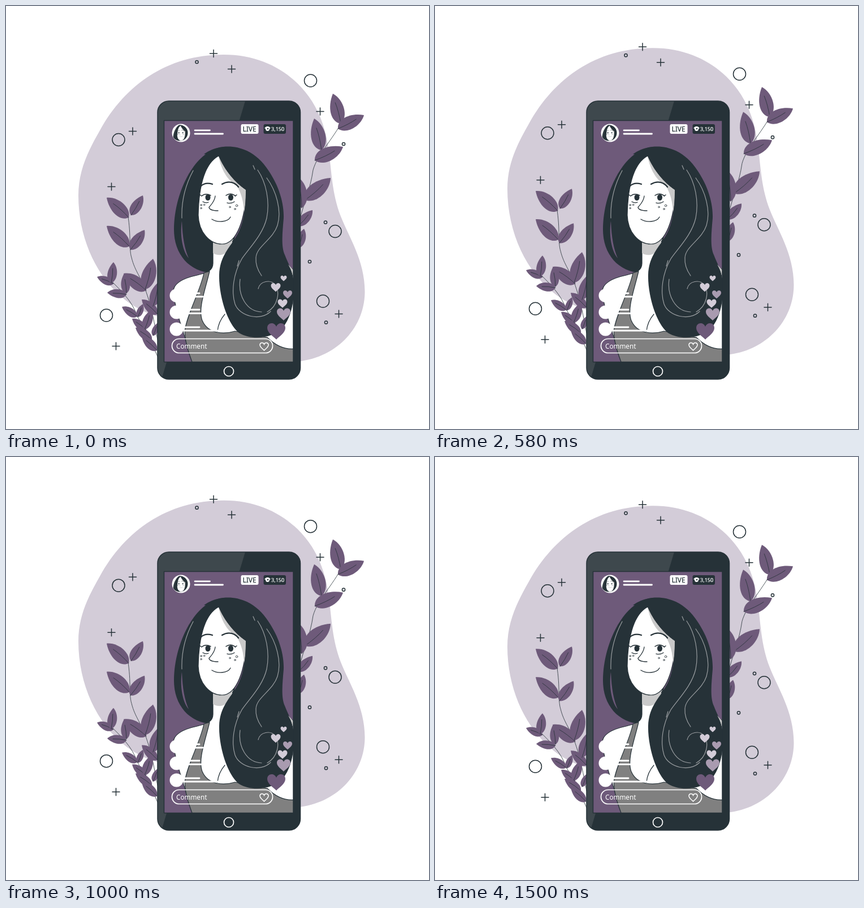
These frames come from a looping animation (748x748 px, 1540 ms). An HTML page:

```html
<!DOCTYPE html>
<html>
<head>
<meta charset="utf-8">
<style>
  html, body { margin: 0; width: 100%; height: 100%; overflow: hidden; background: #fff; }
  svg { display: block; width: 100vw; height: 100vh; }
  .dark { fill: #263238; }
  .purple { fill: #6e5a7a; }
  .line { fill: none; stroke: #263238; stroke-width: 1.5; stroke-linecap: round; stroke-linejoin: round; }
  .thin { stroke-width: .8; }
  .strand { fill: none; stroke: #9a9ea1; stroke-width: 1.2; stroke-linecap: round; }
  .white { fill: none; stroke: #fff; stroke-width: 1.7; stroke-linecap: round; }
  .bars { stroke-width: 2.8; }
  text { font-family: "Noto Sans", "Open Sans", sans-serif; }
</style>
</head>
<body>
<svg viewBox="0 0 748 748">
  <defs>
    <clipPath id="screen"><rect x="279.5" y="202.5" width="228.5" height="427"/></clipPath>
    <clipPath id="body"><rect x="268" y="168" width="252.5" height="492" rx="20"/></clipPath>
    <clipPath id="portrait"><circle cx="307.5" cy="224.5" r="14"/></clipPath>
    <path id="heart" d="M0 .46C-.2 .26-.5 .08-.5-.18C-.5-.48-.12-.54 0-.25C.12-.54 .5-.48 .5-.18C.5 .08 .2 .26 0 .46Z"/>
  </defs>

  <g id="floating">
    <path fill="#d3ccd8" d="M128 335C128 290 146 255 166 220C210 140 285 86 385 86C470 86 530 135 555 195C580 255 568 310 592 372C606 408 634.500 450 634.500 505C634.500 570 582 625 510 629L400 600L270 549C190 530 128 440 128 335Z"/>
    <g id="plants"></g>
    <g id="marks" class="line"></g>
  </g>

  <g clip-path="url(#body)">
    <rect class="dark" x="268" y="168" width="253" height="492"/>
    <path fill="#3e484d" d="M268 168H423L275 660H268Z"/>
  </g>
  <rect class="line" x="268" y="168" width="252.500" height="492" rx="20"/>
  <rect class="purple" x="279.500" y="202.500" width="228.500" height="427"/>

  <g clip-path="url(#screen)">
    <g id="woman">
      <path class="dark" d="M390 249C335 249 297 330 297 395C297 440 325 470 364 472L400 440L420 300Z"/>
      <path class="line" style="fill:#fff;stroke-width:1.200" d="M366 415V455C366 470 352 472 338 476C310 482 296 492 296 505C298 530 308 560 316 585L330 632H512V470C500 456 470 450 396 415Z"/>
      <path class="line" style="fill:#808080;stroke-width:1.200" d="M350 472C344 503 320 545 316 575C317 597 323 613 330 632H512V606C495 608 478 602 462 586L405 575C385 581 357 580 347 556C339 535 353 500 360 469Z"/>
      <path class="line" style="stroke-width:1.200" d="M387 545C380 553 375 564 374 575"/>
      <path fill="#c9c9c9" d="M366 415V437C376 443 386 440 392 434L402 412Z"/>
      <path class="line" style="fill:#fff;stroke-width:1.200" d="M376 265C348 280 341 325 340 370C341 400 360 421 382 421C408 421 424 375 424 325C405 312 388 292 376 265Z"/>
      <path fill="#c9c9c9" d="M376 266C382 295 394 309 409 319C416 332 420 345 421 366C425 345 424 330 424 325C405 312 388 292 376 265Z"/>
      <path class="dark" d="M350 262C380 240 430 243 460 285C480 312 492 345 491 375C489 400 486 425 493 440C499 456 506 466 508 482C511 510 508 545 490 568C472 588 435 592 412 578C390 560 376 510 377 475C378 445 393 430 402 415C418 395 424 365 424 325C405 312 386 290 376 265Z"/>
      <path fill="#c9c9c9" d="M499 457C503 464 507 472 508 481V467Z"/>
      <g class="line">
        <path stroke-width="2.300" d="M344 319Q352 311 365 315M382 315C394 308 405 312 411 320"/>
        <path d="M346 336Q353 330 362 335M389 335Q397 329 406 336M346 336L343 334M405 336L408 334"/>
        <path stroke-width="1.300" d="M348 346Q353 349 358 347M391 348Q398 350 404 346M370 336C369 346 362 352 359 356C360 361 368 362 375 362M364 377C373 383 392 383 397 373"/>
        <g stroke-width=".8">
          <circle cx="345" cy="352" r="1.300"/><circle cx="345" cy="357.500" r="1.300"/><circle cx="350.500" cy="351.500" r="1.300"/>
          <circle cx="396" cy="355.500" r="1.300"/><circle cx="405" cy="359" r="1.300"/><circle cx="408" cy="353" r="1.800"/>
        </g>
      </g>
      <ellipse class="dark" cx="357" cy="338.500" rx="4.500" ry="5.500"/>
      <ellipse class="dark" cx="397.500" cy="338.500" rx="4.500" ry="5.500"/>
      <g class="strand">
        <path d="M331 291C318 315 310 345 311 375M437 282L440 289M445 290C460 312 467 345 461 375C454 405 430 428 417 447C402 473 398 505 405 527C413 549 450 558 468 540"/>
        <path d="M461 304C478 327 488 362 480 388C472 413 443 425 442 445C441 458 447 470 452 477M412 450L409 460"/>
        <path d="M446 500C449 486 468 483 476 493C485 506 481 530 462 541M414 483C410 512 425 540 452 541"/>
      </g>
      <path class="purple" d="M311 380C312 410 316 430 323 446C310 430 308 400 311 380Z"/>
    </g>

    <g fill="#fff">
      <circle cx="301.500" cy="512" r="12"/><circle cx="301.500" cy="541.500" r="12"/><circle cx="301.500" cy="571.500" r="12"/>
    </g>
    <path class="white bars" d="M318 508H342M318 514H348M318 537H342M318 543.500H346M315 568H342M315 574H374"/>
    <g id="hearts"></g>
    <rect class="white" x="293.500" y="588.500" width="178" height="25" rx="12.500"/>
    <use href="#heart" class="white" style="stroke-width:.1" transform="translate(456.500 602) scale(15)"/>
    <text x="301" y="606" font-size="11.700" fill="#fff">Comment</text>

    <circle cx="309.500" cy="224.500" r="16" fill="#fff"/>
    <g clip-path="url(#portrait)"><use href="#woman" transform="translate(245 166.500) scale(.17)"/></g>
    <path class="white bars" d="M334 219.800H360.500M334 226H383.500"/>
    <rect x="415.500" y="209" width="31" height="17" rx="3" fill="#fff"/>
    <text x="418.500" y="222" font-size="12" class="dark" stroke="#263238" stroke-width=".2">LIVE</text>
    <rect x="455.500" y="209" width="39.500" height="17" rx="3" class="dark"/>
    <path fill="#fff" d="M457 216Q462.500 209.500 468 216L466 217Q466 221 462.500 221Q459 221 459 217Z"/>
    <circle cx="463" cy="217" r="1.300" class="dark"/>
    <text x="469" y="221" font-size="9.100" fill="#fff" stroke="#fff" stroke-width=".2">3,150</text>
  </g>
  <rect class="line" x="279.500" y="202.500" width="228.500" height="427"/>
  <circle class="white" cx="394" cy="646" r="8.500"/>
</svg>
<script>
const byId = id => document.getElementById(id);

// A leaf from its base to its tip, bulging l to the left and r to the right.
function leaf(bx, by, tx, ty, l = .3, r = l) {
  const dx = tx - bx, dy = ty - by;
  const at = (u, v) => `${(bx + dx * u - dy * v).toFixed(1)} ${(by + dy * u + dx * v).toFixed(1)}`;
  return `<path class="purple" d="M${at(0, 0)}C${at(.12, -l)} ${at(.6, -l)} ${at(1, 0)}C${at(.72, r)} ${at(.15, r)} ${at(0, 0)}Z"/>
    <path class="line thin" d="M${at(0, 0)}Q${at(.4, .04)} ${at(.7, 0)}"/>`;
}
const stem = d => `<path class="line thin" d="${d}"/>`;

const leaves = [
  [592, 208, 578, 155], [587, 217, 633, 193], [558, 255, 545, 199], [546, 273, 596, 249],
  [529, 343, 574, 304], [523, 357, 517, 303], [517, 389, 542, 361], [517, 428, 527, 394],
  [217, 374, 178, 339], [221, 370, 242, 335], [218, 425, 178, 389], [220, 431, 245, 396],
  [248, 503, 208, 473], [246, 501, 260, 447], [268, 545, 240, 519], [260, 531, 271, 487],
  [190, 491, 161, 479], [186, 490, 190, 453], [213, 510, 179, 507], [213, 508, 209, 473],
  [232, 549, 205, 532], [233, 550, 242, 527], [248, 573, 223, 553], [245, 572, 257, 537],
  [258, 590, 229, 569], [260, 583, 269, 560], [267, 609, 240, 584]
];
byId('plants').innerHTML =
  stem('M597 200C575 240 551 262 543 290C538 325 526 350 519 380') +
  stem('M214 362C222 400 217 430 222 445C228 470 240 480 250 512C258 535 262 560 268 590') +
  stem('M180 480C205 505 222 520 233 550C245 570 255 590 269 622') +
  leaves.map(l => leaf(...l)).join('');

const circle = r => ([x, y]) => `<circle cx="${x}" cy="${y}" r="${r}"/>`;
const plus = ([x, y]) => `<path d="M${x - 6.5} ${y}h13M${x} ${y - 6.5}v13"/>`;
byId('marks').innerHTML = [
  ...[[199, 236.5], [538.5, 132], [582, 398.5], [560.5, 522], [177.5, 547]].map(circle(11)),
  ...[[337.5, 99], [597, 244], [565, 382.5], [537, 452], [566, 559.5]].map(circle(2.6)),
  ...[[367, 84], [399, 111.5], [555.5, 186.5], [224, 221.5], [186.5, 319.5], [588.5, 544.5], [194.5, 601.5]].map(plus)
].join('');

byId('hearts').innerHTML = [
  [491, 481.5, 11, '#d3ccd8'], [477, 497.5, 17, '#d3ccd8'], [498, 510, 16, '#a99bb0'],
  [489, 526, 17, '#d3ccd8'], [491, 545, 24, '#a99bb0'], [478, 575, 32, '#6e5a7a']
].map(([x, y, s, c]) => `<use href="#heart" fill="${c}" transform="translate(${x} ${y}) scale(${s})"/>`).join('');

const LOOP = 1540, TOP = 725, BOTTOM = 1500, RISE = 15;
function draw() {
  const t = performance.now() % LOOP;
  const lift = t < TOP ? .02 + .98 * t / TOP : Math.max(0, (BOTTOM - t) / (BOTTOM - TOP));
  byId('floating').setAttribute('transform', `translate(0 ${.3 - RISE * lift})`);
  requestAnimationFrame(draw);
}
draw();
</script>
</body>
</html>
```
